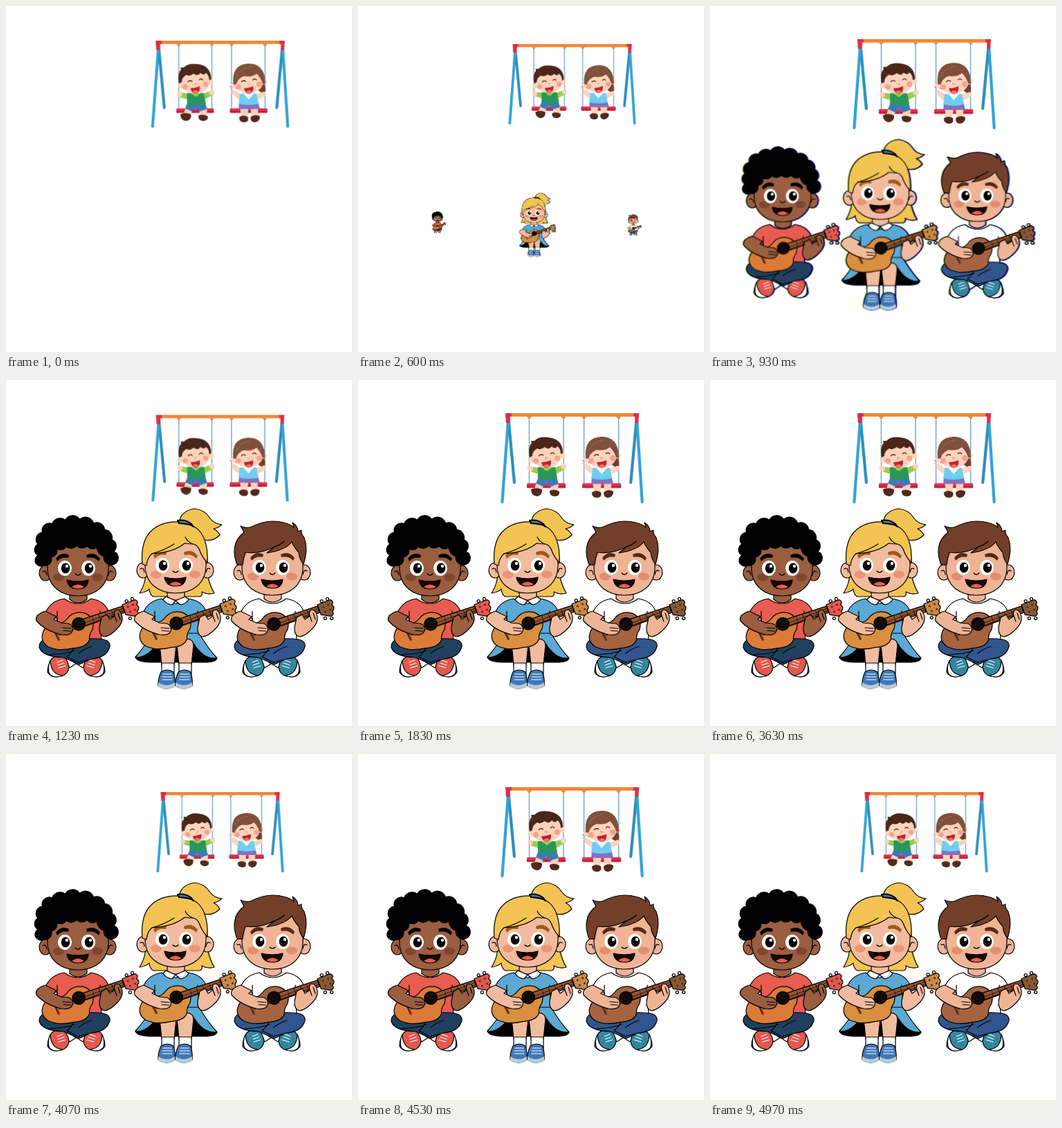
Animation, 500 px wide and 500 px high, one loop 5 s. Source, as an HTML page without scripts:

```html
<!DOCTYPE html>
<html lang="en">
<head>
<meta charset="utf-8">
<title>Playground band</title>
<style>
html, body { margin: 0; width: 100%; height: 100%; overflow: hidden; background: #fff; }
svg { display: block; width: 100vw; height: 100vh; }

/* outlined band members */
.kid { stroke: #000; stroke-width: 1.2; stroke-linejoin: round; stroke-linecap: round;
  transform-box: fill-box; transform-origin: center;
  animation: pop 5s infinite, fringe 5s step-end infinite; }
.girl { animation-name: pop-first, fringe; }
.skin { fill: var(--skin); }
.top { fill: var(--top); }
.pants { fill: var(--pants); }
.shoe { fill: var(--shoe); }
.wood { fill: var(--wood); }
.peg { fill: var(--peg); }
.hair { fill: var(--hair); }
.white { fill: #fff; }
.line { fill: none; }
.flat { stroke: none; }

.ann { --skin: #f2bb9f; --top: #5ba9d4; --shoe: #3f78b8; --wood: #d98f3f; --peg: #c78a45; --hair: #f3c453; --cheek: #ea9474; --brow: #9c5a1c; }
.ben { --skin: #9b5e40; --top: #e85c50; --pants: #21405f; --shoe: #e4584e; --wood: #dc7b37; --peg: #e4584e; --hair: #000; --cheek: #7f4630; --brow: #000; }
.cal { --skin: #efb496; --top: #fff; --pants: #31558d; --shoe: #32869f; --wood: #a5633f; --peg: #8a5636; --hair: #743f2a; --cheek: #e08e6c; --brow: #54291a; }

@keyframes pop {
  0%, 11.2% { transform: scale(0); animation-timing-function: cubic-bezier(.2, .3, .2, 1); }
  23%, 100% { transform: none; }
}
@keyframes pop-first {
  0%, 10% { transform: scale(0); animation-timing-function: cubic-bezier(.2, .3, .2, 1); }
  23%, 100% { transform: none; }
}
@keyframes fringe {
  0% { filter: drop-shadow(1px 0 #22f) drop-shadow(-1px 0 #9d5); }
  22%, 100% { filter: none; }
}

/* swing set: one beat every 900 ms, rest between beats */
.swing { transform-origin: 309.5px 113px; animation: beat 5s cubic-bezier(.37, 0, .63, 1) infinite; }
@keyframes beat {
  0% { transform: scale(.966); animation-timing-function: cubic-bezier(.33, .44, .66, 1); }
  3.3%, 21.3%, 39.3%, 57.3%, 75.3%, 93.3% { transform: scale(1.107); }
  8.7%, 15.9%, 26.7%, 33.9%, 44.7%, 51.9%, 62.7%, 69.9%, 80.7%, 87.9%, 98.7%, 100% { transform: scale(.893); }
}
.tot { --skin: #fdd3bb; }
.rope { stroke: #5c9cce; stroke-width: 1.3; }
.post { stroke: #31a2d5; stroke-width: 4.2; stroke-linecap: round; }
.back { stroke: #2b8dbd; }
</style>
</head>
<body>
<svg viewBox="0 0 500 500">
<defs>
  <g id="face">
    <path class="skin" d="M92 304V316Q104 326 117 316V304Z"/>
    <ellipse class="skin" cx="57" cy="278" rx="9" ry="11"/>
    <ellipse class="skin" cx="150" cy="278" rx="9" ry="11"/>
    <path class="line" d="M53 276Q58 273 59 281M154 276Q149 273 148 281"/>
    <path class="skin" d="M60 242V272C61 298 80 311 104 311S147 298 148 272V242Q104 212 60 242Z"/>
    <g class="flat">
      <ellipse cx="76" cy="284" rx="8" ry="5.5" fill="var(--cheek)"/>
      <ellipse cx="132" cy="284" rx="8" ry="5.5" fill="var(--cheek)"/>
      <path d="M72 257Q80 246 91 252L90 256Q81 254 74 261ZM136 257Q128 246 116 252L117 256Q127 254 134 261Z" fill="var(--brow)"/>
      <g id="eye">
        <ellipse class="white" cx="85" cy="271" rx="10" ry="11"/>
        <ellipse cx="86" cy="271" rx="6.3" ry="7.5" fill="#000"/>
        <circle class="white" cx="88" cy="268" r="2.2"/>
      </g>
      <use href="#eye" x="34"/>
    </g>
    <path class="line" d="M100 279Q104 283 108 279"/>
    <path d="M88 288Q104 292 119 288Q118 301 104 301T88 288Z" fill="#170706"/>
    <path class="flat" d="M95 298Q104 291 113 298Q104 303 95 298Z" fill="#e4604d"/>
  </g>

  <g id="guitar" transform="translate(-4 -10) scale(1.03)">
    <path class="peg" d="M167 325L185 318Q191 320 187 325Q193 329 188 334Q192 340 184 341L172 339Z"/>
    <g class="white"><circle cx="173" cy="320" r="2"/><circle cx="181" cy="317" r="2"/><circle cx="178" cy="344" r="2"/><circle cx="187" cy="344" r="2"/></g>
    <g class="flat" fill="#5a2d1e"><circle cx="175" cy="328" r="1.5"/><circle cx="182" cy="325" r="1.5"/><circle cx="178" cy="335" r="1.5"/><circle cx="185" cy="332" r="1.5"/></g>
    <path class="wood" d="M56 363Q62 350 77 351Q86 351 92 342Q101 333 115 337Q130 344 125 360Q120 367 121 374Q117 385 98 386Q78 391 63 384Q51 376 56 363Z"/>
    <path d="M112 345L167 327L170 336L115 355Z" fill="#96552f"/>
    <path class="line" stroke-width=".7" d="M76 365L169 330M78 368L170 333M125 342L128 350M134 339L137 347M143 336L146 344M152 333L155 341"/>
    <circle cx="106" cy="352" r="9" fill="#120b0a"/>
    <path d="M72 362L78 374" stroke="#5a2d1e" stroke-width="3"/>
  </g>

  <g id="torso">
    <path class="top" d="M84 316Q104 330 123 316Q142 319 148 334L137 347L138 384H73L74 345L57 337Q64 319 84 316Z"/>
    <path class="line" d="M74 334V347M136 334V347"/>
  </g>

  <g id="arms">
    <path class="skin" d="M57 334Q41 339 44 348Q56 362 80 368Q93 370 96 363Q98 356 91 352L80 351L69 346L73 342Z"/>
    <path class="line" d="M82 358L94 359M83 362L94 363"/>
    <path class="skin" d="M138 343L135 357Q134 369 142 371Q151 370 161 359Q169 351 168 342Q166 332 160 332Q155 333 157 341L150 346L146 339Z"/>
    <path class="line" d="M157 341L160 349M162 337L165 346"/>
  </g>

  <g id="foot">
    <path class="skin" d="M92 398L104 390L115 401L102 410Z"/>
    <path class="white" d="M83 400L94 396L104 408L92 416Z"/>
    <path class="shoe" d="M66 403Q73 396 84 399Q90 407 91 415Q90 425 80 428Q64 431 60 422Q60 412 66 403Z"/>
    <path class="white" d="M64 405Q59 417 63 425Q70 432 82 427Q72 426 68 420Q64 413 64 405Z"/>
    <path class="line" stroke="#fff" d="M74 408L82 405M75 412L84 409M76 416L86 413"/>
  </g>

  <g id="sitting">
    <use href="#foot"/>
    <use href="#foot" transform="matrix(-1 0 0 1 203 0)"/>
    <path class="pants" d="M65 373Q48 374 48 386Q52 400 83 401L106 411L119 405L102 391L136 376Z"/>
    <path class="pants" d="M134 374Q151 375 150 385Q146 401 124 403L104 408L88 400Q104 385 100 373Z"/>
    <path class="line" d="M62 397Q85 396 99 391M124 385Q112 389 105 395"/>
  </g>

  <g id="tot-face">
    <circle class="skin" cx="250" cy="115" r="4.5"/>
    <circle class="skin" cx="295" cy="109" r="4.5"/>
    <ellipse class="skin" cx="272" cy="108" rx="22" ry="19"/>
    <g fill="#f6a091"><circle cx="257" cy="117" r="4"/><circle cx="288" cy="113" r="4"/></g>
    <path d="M261 110Q264 106 268 109M278 107Q281 103 284 107" fill="none" stroke="#4a211a" stroke-width="1.3"/>
    <path d="M270 112Q272 114 274 112" fill="none" stroke="#d98472"/>
    <path d="M265 119Q272 119 279 116Q280 126 273 127Q267 127 265 119Z" fill="#be2030"/>
    <path d="M268 124Q273 120 277 124Q273 129 268 124Z" fill="#f5756e"/>
  </g>
</defs>

<g class="swing">
  <path class="post back" d="M218 62L226 148M402 62L394 148"/>
  <path class="post" d="M217 60L208.500 176M403 60L410.500 176"/>
  <path d="M218 50.5H402" stroke="#f58535" stroke-width="5"/>
  <path d="M213 48H222V53H220V62H214ZM406 48H398V53H400V62H405Z" fill="#db3044"/>
  <path d="M244 53H251L247.5 57ZM293.500 53H300.500L297 57ZM323 53H330L326.500 57ZM373 53H380L376.500 57Z" fill="#f58535"/>
  <path class="rope" d="M247.500 55V150M297 55V150M326.500 55V150M376.500 55V150"/>
  <g fill="#dc3147"><rect x="244" y="149" width="56" height="7" rx="1.5"/><rect x="324" y="149" width="56" height="7" rx="1.5"/></g>
  <path d="M244 154H300M324 154H380" stroke="#b51f39" stroke-width="2"/>

  <g class="tot">
    <path d="M262 127L249 125L248 132L261 136ZM284 127L297 122L299 129L286 136Z" fill="#92cf4d"/>
    <circle class="skin" cx="249" cy="128" r="4"/><circle class="skin" cx="297" cy="125" r="4"/>
    <path class="skin" d="M258 148H270L265 160H254ZM278 149H290L289 161H279Z"/>
    <path d="M261 140H287L290 150L278 154L272 148L268 154L257 149Z" fill="#3f78b8"/>
    <path d="M260 126H285L288 142Q274 146 260 142Z" fill="#29975c"/>
    <path d="M265 126L273 132L281 126Z" fill="#92cf4d"/>
    <path d="M250 158Q257 154 266 158Q267 166 259 168Q250 167 250 158ZM277 160Q284 157 291 161Q292 168 284 168Q276 167 277 160Z" fill="#512a1d"/>
    <use href="#tot-face"/>
    <path d="M248 112Q245 98 251 91L250 88L255 88Q262 81 275 83Q296 85 296 106L293 107Q293 99 288 96Q285 101 280 96Q276 102 270 97Q263 102 259 99Q252 103 252 110Z" fill="#4a261b"/>
  </g>

  <g class="tot">
    <path d="M331 109Q327 115 324 117L342 122L366 122L373 127Q378 127 377 118L372 100Z" fill="#6f402c"/>
    <path class="skin" d="M340 128L330 121Q325 121 327 127L337 136ZM364 128L375 124Q380 125 377 131L366 136Z"/>
    <path class="skin" d="M339 147H352L350 162H341ZM355 147H366L366 162H356Z"/>
    <path d="M338 139H366L369 150H337Z" fill="#866fc0"/>
    <path d="M339 127H364L367 142Q352 146 337 142Z" fill="#70cdf2"/>
    <path d="M344 127L352 136L360 127Z" fill="#e9f8ff"/>
    <path d="M338 162Q344 158 351 162Q353 170 345 170Q337 169 338 162ZM355 162Q362 157 369 161Q369 169 361 170Q354 169 355 162Z" fill="#512a1d"/>
    <use href="#tot-face" x="80"/>
    <path d="M329 113Q326 83 352 82Q377 82 377 113L373 112Q370 103 364 97Q357 103 345 101Q336 104 333 114Z" fill="#80503a"/>
    <path d="M334 101Q339 89 354 87" fill="none" stroke="#95634a" stroke-width="1.5"/>
  </g>
</g>

<g class="kid ben">
  <path class="hair" transform="translate(4 14) scale(.95)" d="M52 268a9 9 0 0 1-8-16a10 10 0 0 1 0-17a11 11 0 0 1 7-18a11 11 0 0 1 15-13a13 13 0 0 1 20-6a13 13 0 0 1 22-1a13 13 0 0 1 21 6a12 12 0 0 1 17 10a12 12 0 0 1 11 15a11 11 0 0 1 3 18a10 10 0 0 1-8 20Z"/>
  <use href="#torso"/>
  <use href="#sitting"/>
  <use href="#face" y="1"/>
  <path class="hair" d="M58 268Q67 266 66 256Q75 253 74 244Q82 248 87 241Q95 246 102 240Q110 246 117 240Q124 247 131 242Q133 253 141 255Q141 265 150 267L153 235L104 214L54 235Z"/>
  <use href="#guitar"/>
  <use href="#arms"/>
</g>

<g class="kid girl ann">
  <path class="hair" d="M250 210Q250 189 273 186Q288 188 295 200Q301 208 312 209Q306 214 300 215Q307 219 309 224Q299 234 287 231Q276 229 264 207Z"/>
  <path class="hair" d="M199 260Q207 286 193 308Q204 306 207 302Q208 311 213 313H280Q285 311 283 306Q292 311 301 308Q288 286 291 258Z"/>
  <use href="#torso" x="141"/>
  <path d="M214 374L187 400Q188 408 212 408H287Q304 408 305 402L277 374Z" fill="#000"/>
  <path class="top" d="M214 366L187 401Q202 402 217 384Q245 362 272 382Q286 404 305 402Q292 388 279 366Z"/>
  <g id="leg">
    <path class="skin" d="M222 382Q223 374 234 374Q246 374 246 383L243 412H225Z"/>
    <path class="white" d="M225 409H243V425H225Z"/>
    <path class="shoe" d="M224 422Q233 416 242 422Q245 433 244 442Q232 450 220 442Q219 433 224 422Z"/>
    <path class="flat" d="M220 437Q232 445 244 437V443Q232 450 220 443Z" fill="#b9cad6"/>
    <path class="line" stroke="#fff" d="M227 425H239M226 429H240M226 433H240"/>
  </g>
  <use href="#leg" x="25"/>
  <use href="#face" x="141" y="-3"/>
  <path class="white" d="M231 313L245 319L240 325Q230 323 227 317ZM259 313L245 319L252 325Q261 323 264 317Z"/>
  <path class="hair" d="M197 266Q194 232 211 217Q226 204 250 205Q279 208 287 231Q292 245 291 264Q283 256 279 244Q275 237 270 237Q264 237 258 236Q243 249 211 251Q204 257 203 268Z"/>
  <path class="line" d="M270 237Q262 234 259 227M211 251Q229 246 243 237"/>
  <path d="M248 203Q259 201 268 208L271 212Q267 208 250 207Z" fill="#3f78b8" stroke-width="2"/>
  <use href="#guitar" x="141" y="-1"/>
  <use href="#arms" x="142"/>
</g>

<g class="kid cal">
  <use href="#torso" x="282"/>
  <use href="#sitting" x="282"/>
  <use href="#face" x="281"/>
  <path class="hair" d="M334 267Q328 251 331 240Q332 230 344 220L339 211Q348 215 355 212Q379 200 401 206Q410 208 416 213L414 206Q422 211 422 219L427 217Q426 222 431 228Q437 244 430 266Q424 260 423 249Q417 243 413 234Q404 246 377 250L388 241Q367 252 346 249Q343 258 342 267Z"/>
  <path class="line" d="M388 241Q397 238 402 233"/>
  <use href="#guitar" x="282"/>
  <use href="#arms" x="282"/>
</g>
</svg>
</body>
</html>
```
